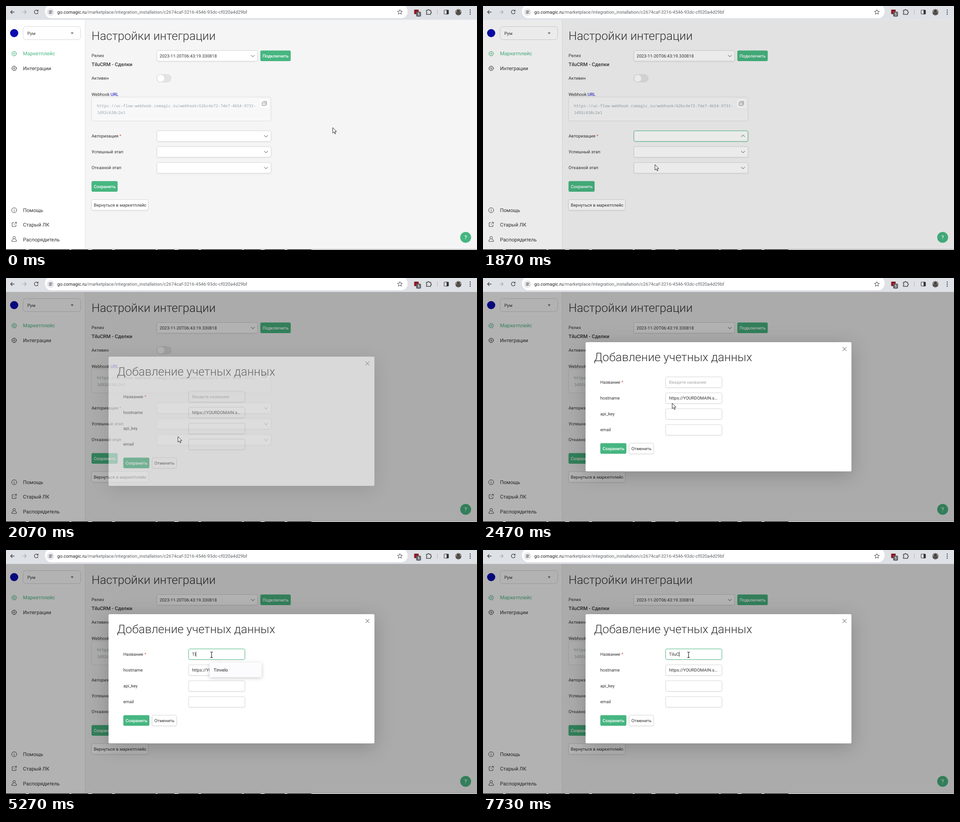
Animation of 1038 by 540 pixels, one loop 8000 ms. Source, as an HTML page:

```html
<!DOCTYPE html>
<html lang="ru">
<meta charset="utf-8">
<title>Настройки интеграции</title>
<style>
html, body { margin: 0; width: 100%; height: 100%; overflow: hidden; background: #f5f5f5 }
svg { display: block; width: 1038px; height: 540px }
text { font: 9.6px Roboto, sans-serif; fill: #333; text-rendering: geometricPrecision; white-space: pre }
.title { font-size: 26px; font-weight: 300 }
.menu { font-size: 11.2px }
.sub { font-size: 11px; font-weight: 500 }
.white { fill: #fff; font-weight: 500 }
.badge { font-size: 8.5px }
.help { font-size: 11.5px }
.suggestion { font-size: 9.9px; fill: #222 }
.url { font-size: 10.09px; fill: #5f6368 }
.mono { font: 8.73px "Noto Sans Mono", monospace; fill: #97a4ac }
.hint { fill: #aaa }
.green { fill: #47b681 }
.red { fill: #e2503c }
.blue { fill: #0a0ac4 }
.line { fill: none; stroke: #444; stroke-width: 1 }
.soft { filter: drop-shadow(0 1px 1px #0001) }
.float { filter: drop-shadow(0 2px 4px #0003) }
.modal { filter: drop-shadow(0 8px 20px #0003) }
</style>
<body>
<script>
const GREEN = '#47b681', BORDER = '#d6d6d6';

const text = (x, y, s, cls = '', id = '') => `<text x="${x}" y="${y}" class="${cls}" id="${id}">${s}</text>`;
const rect = (x, y, w, h, fill, stroke = 'none', r = 3, extra = '') =>
  `<rect x="${x}" y="${y}" width="${w}" height="${h}" rx="${r}" fill="${fill}" stroke="${stroke}" ${extra}/>`;
const circle = (x, y, r, fill, extra = '') => `<circle cx="${x}" cy="${y}" r="${r}" fill="${fill}" ${extra}/>`;
const path = (d, extra = '') => `<path d="${d}" class="line" ${extra}/>`;
const group = (id, s) => `<g id="${id}">${s}</g>`;
const button = (x, y, w, label) => rect(x, y, w, 23.5, GREEN) + text(x + 5, y + 15.5, label, 'white');
const plainButton = (x, y, w, label) =>
  rect(x, y, w, 23.5, '#fff', BORDER, 3, 'class="soft"') + text(x + 5, y + 15.5, label);
const field = (x, y, w, id = '') => rect(x, y, w, 23.5, '#fff', BORDER, 3, `class="soft" id="${id}"`);
const chevron = (x, y, id = '') => path(`M${x - 4} ${y - 2}l4 4l4 -4`, `id="${id}"`);

const toolbar = rect(0, 0, 1038, 30.5, '#dee1e6', 'none', 0) + rect(86, -3, 799, 30, '#fff', 'none', 14) +
  path('M18.5 13.5h-8M14 9.5l-4 4l4 4', 'style="stroke-width:1.3"') +
  path('M36 13.5h8M40.5 9.5l4 4l-4 4', 'style="stroke:#a3a6aa;stroke-width:1.2"') +
  path('M70 10.6a4.2 4.2 0 1 0 .8 3.4M70.6 8.6v2.8h-2.8', 'style="stroke-width:1.3"') +
  circle(98, 13.5, 8.5, '#e9ebee') +
  path('M94 11.5h3M100 11.5h2.5M94 15.5h2.5M99.5 15.5h3') +
  circle(98.6, 11.5, 1.4, 'none', 'class="line"') + circle(97.6, 15.5, 1.4, 'none', 'class="line"') +
  text(113, 17, '<tspan fill="#202124">go.comagic.ru</tspan>/marketplace/integration_installation/c2674caf-3216-4546-93dc-cf020a4d29bf', 'url') +
  path('M868 8l1.5 3.6l3.9 .3l-3 2.5l1 3.8l-3.4 -2.1l-3.4 2.1l1 -3.8l-3 -2.5l3.9 -.3z') +
  rect(899.5, 8, 10, 10, '#8c1b24', 'none', 1) + rect(904, 12.5, 10.5, 11, '#5b5e63', 'none', 2) +
  text(907, 21.3, '5', 'white badge') +
  path('M926.5 9.5h3a1.7 1.7 0 0 1 3.4 0h3v3a1.7 1.7 0 0 1 0 3.4v2.6h-9.4v-3a1.6 1.6 0 0 0 0 -3z', 'style="stroke-width:1.4"') +
  path('M950.5 8v11', 'style="stroke:#b4b7bb"') +
  rect(965.5, 9, 9.5, 9, 'none', '#333', 1) + rect(971, 9, 4.5, 9, '#333', 'none', 0) +
  circle(997, 13.5, 7, '#8f8a86') + circle(997, 11.5, 3, '#3c3836') +
  path('M991 17a6 5 0 0 1 12 0a7 7 0 0 1 -12 0', 'style="fill:#55504e;stroke:none"') +
  [9, 13.5, 18].map(y => circle(1023, y, 1.2, '#333')).join('');

const cog = (y, color) => circle(18, y, 4.6, 'none', `stroke="${color}"`) +
  circle(18, y, 5.3, 'none', `stroke="${color}" stroke-dasharray="2 2.16"`) + circle(18, y, 1.7, 'none', `stroke="${color}"`);

const sidebar = rect(0, 31, 174, 507, '#fff', 'none', 0) + path('M174.5 31V538', 'style="stroke:#e4e4e4"') +
  circle(18, 60, 9, '#0b0bb0') + rect(37.5, 45.5, 127, 29, '#fff', BORDER, 6) +
  text(47, 63.5, 'Рум') + '<path d="M142.5 58.5h6.5l-3.25 4z" fill="#777"/>' +
  cog(105.5, GREEN) + text(37.5, 109.4, 'Маркетплейс', 'menu green') +
  cog(138, '#444') + text(37.5, 142, 'Интеграции', 'menu') +
  circle(18, 452, 5.5, 'none', 'class="line"') + path('M18 451v4M18 448.8v1.2') + text(37.5, 456, 'Помощь', 'menu') +
  path('M17.5 479.5h-4v8.5h8.5v-4M17.5 484l5.5 -5.5M19.5 478.5h3.5v3.5') + text(37.5, 488, 'Старый ЛК', 'menu') +
  circle(18, 512.8, 2.8, 'none', 'class="line"') + path('M16.5 515.5l-3.5 2.5v3h10v-3l-3.5 -2.5') +
  text(37.5, 520.7, 'Распорядитель', 'menu');

const page = text(188.5, 75, 'Настройки интеграции', 'title') +
  text(188.5, 113.4, 'Релиз') + field(332.5, 98.5, 222) + text(338.5, 113.5, '2023-11-20T06:43:19.330818') + chevron(544, 110.5) +
  button(560.5, 98.5, 67, 'Подключить') + text(188.5, 132.8, 'TiluCRM - Сделки', 'sub') +
  text(188.5, 163.4, 'Активен') + rect(332, 151.5, 32, 17, '#e3e3e3', '#d9d9d9', 8.5) + circle(341, 160, 7.7, '#fff') +
  text(188.5, 199, 'Webhook') + text(230.5, 199, 'URL', 'blue') +
  rect(188.5, 201.5, 395.5, 53, '#f8f8f8', '#dcdcdc') +
  text(200.5, 223.8, 'https://uc-flow-webhook.comagic.ru/webhook/62bc4e72-7de7-4b54-9731-', 'mono') +
  text(200.5, 238.8, '1d92c638c2e1', 'mono') + rect(558, 204.5, 23, 22.5, '#fff', '#ececec') +
  path('M566.5 211h8v8M564.5 213h8v7.5h-8zM567.5 215l-1.3 1.7l1.3 1.7M569.5 215l1.3 1.7l-1.3 1.7', 'style="stroke:#777;stroke-width:.8"') +
  text(188.5, 291, 'Авторизация') + text(250, 291, '*', 'red') + field(332.5, 276.2, 251.5, 'auth') + chevron(573, 288, 'authChevron') +
  text(188.5, 326, 'Успешный этап') + field(332.5, 311.2, 251.5) + chevron(573, 323) +
  text(188.5, 361.2, 'Отказной этап') + field(332.5, 346.5, 251.5) + chevron(573, 358.3) +
  button(188.5, 387.5, 57.5, 'Сохранить') + plainButton(188.5, 428.5, 125, 'Вернуться в маркетплейс') +
  circle(1013, 512, 12, GREEN) + text(1010.2, 516, '?', 'white help');

const options = ['https://uiscom.s20.online/', 'ТилуСРМ', 'https://uiscom2.s20.online/', 'TiluCRM API Auth', 'https://uiscom3.s20.online/'];
const dropdown = rect(333, 300.5, 251, 206, '#fff', 'none', 2, 'class="float"') +
  rect(338.5, 306.5, 239, 23, '#fff', GREEN) + circle(350, 316.8, 3.6, 'none', 'class="line"') + path('M352.7 319.5l3 3M361.5 312.5v11') +
  path('M339.5 344.5h10M344.5 339.5v10') + text(356, 348, 'Добавить') + path('M333 359.5h251', 'style="stroke:#e5e5e5"') +
  options.map((s, i) => text(342, 377.3 + i * 29.3, s)).join('');

const labels = ['Название', 'hostname', 'api_key', 'email'];
const modal = rect(226, 142, 586, 286, '#fff', 'none', 3, 'class="modal"') +
  path('M792.3 152.8l8.6 8.6M800.9 152.8l-8.6 8.6') + text(244.5, 183.5, 'Добавление учетных данных', 'title') +
  labels.map((s, i) => text(258.5, 233.6 + i * 35.2, s) + field(402.5, 218.9 + i * 35.2, 124, 'input' + i)).join('') +
  text(305, 233.6, '*', 'red') + text(410, 269.3, 'https://YOURDOMAIN.s…') +
  text(410, 234.2, 'Введите название', 'hint', 'hint') + text(410, 234.2, '', '', 'typed') +
  rect(0, 225, 1, 11, '#222', 'none', 0, 'id="caret"') +
  button(258.5, 365.5, 57.5, 'Сохранить') + plainButton(322, 365.5, 54, 'Отменить');

const pointer = '<path id="arrow" d="M0 0V12.2L2.8 9.6L4.8 14L6.7 13.2L4.8 8.9H8.5Z" fill="#fff" stroke="#111" stroke-width=".9"/>' +
  path('M-3 -6h2.2l.8 .7l.8 -.7h2.2M0 -5.3V5.3M-3 6h2.2l.8 -.7l.8 .7h2.2', 'id="beam" style="stroke:#111;stroke-width:1.1"');

document.body.innerHTML = `<svg viewBox="0 0 1038 540">${rect(0, 0, 1038, 540, '#f5f5f5', 'none', 0)}${sidebar}${page}` +
  group('dropdown', dropdown) + rect(0, 30.5, 1038, 508, '#000', 'none', 0, 'id="shade"') + toolbar +
  path('M0 538.6H1038', 'style="stroke:#8a8a8a"') + path('M0 539.5H673', 'style="stroke:#111" stroke-dasharray="44 6 90 4 37 9"') +
  group('modal', modal) + group('popup', '') + group('pointer', pointer) + '</svg>';

const $ = id => document.getElementById(id);
const ramp = (t, from, to) => Math.max(0, Math.min(1, (t - from) / (to - from)));
const show = (id, opacity) => $(id).setAttribute('opacity', +opacity);

// Pointer stops: time, x, y
const route = [[200, 720, 269], [733, 448, 296], [1000, 448, 296], [1267, 424, 341], [1700, 379, 351],
  [2133, 379, 351], [2467, 417, 277], [2733, 440, 248], [3067, 453, 232]];
function pointerAt(t) {
  const i = route.findIndex(p => p[0] > t);
  if (i < 0) return route.at(-1).slice(1);
  if (!i) return route[0].slice(1);
  const [a, b] = [route[i - 1], route[i]], k = ramp(t, a[0], b[0]), e = k * k * (3 - 2 * k);
  return [a[1] + (b[1] - a[1]) * e, a[2] + (b[2] - a[2]) * e];
}

const FOCUS = 3130, keyTimes = [4860, 5260, 7060, 7260, 7730], word = 'TiluC';
const suggestions = [
  ['Тестовая интеграция', 'Сделки', 'Продажи', 'Тест', 'Новая заявка', 'Tinvelo'],
  ['Tinvelo', 'Test', 'Test 2', 'Tariff', 'Token', 'Type'],
  ['Tinvelo']];

function popupMarkup(typed) {
  const rows = suggestions[Math.min(typed, 2)], w = typed ? 115 : 159.5;
  return `<g class="float">${rect(448.5, 249, w, 32.5 + (rows.length - 1) * 26.6, '#fcfbfd', 'none', 2)}` +
    '<path d="M458 249.5l5 -4l5 4z" fill="#fcfbfd"/></g>' +
    rows.map((s, i) => text(457.5, 269 + i * 26.6, s, 'suggestion')).join('');
}

function draw(time) {
  // The picture advances 15 times a second.
  const t = Math.floor((time + 4) * 15 / 1000) * 1000 / 15;

  const open = t >= 995 && t < 1930;
  $('auth').setAttribute('stroke', t >= 460 && t < 1930 ? GREEN : BORDER);
  $('authChevron').setAttribute('transform', open ? 'matrix(1 0 0 -1 0 575.5)' : '');
  show('dropdown', ramp(t, 940, 1130) * (1 - ramp(t, 1720, 1860)));
  show('shade', 0.3 * ramp(t, 1795, 2065));

  const rise = ramp(t, 1900, 2200);
  show('modal', rise);
  $('modal').setAttribute('transform', `translate(0 ${72 * (1 - rise)})`);

  const typed = keyTimes.filter(k => t >= k).length, focused = t >= FOCUS;
  $('input0').setAttribute('stroke', focused ? GREEN : BORDER);
  show('hint', !typed);
  $('typed').textContent = word.slice(0, typed);
  $('caret').setAttribute('x', 410 + (typed && $('typed').getComputedTextLength()));
  show('caret', focused && (t - (typed ? keyTimes[typed - 1] : FOCUS)) % 1066.7 < 530);

  const popup = $('popup');
  if (popup.dataset.typed !== String(typed)) {
    popup.dataset.typed = typed;
    popup.innerHTML = popupMarkup(typed);
  }
  show('popup', focused ? 1 - ramp(t, 7000, 7200) : 0);

  const [x, y] = pointerAt(t);
  const beam = t > 2200 && ((y > 219 && y < 242.5) || (y > 254 && y < 276.5));
  $('pointer').setAttribute('transform', `translate(${x} ${y})`);
  show('arrow', !beam);
  show('beam', beam);
}

const start = performance.now();
(function tick() {
  draw((performance.now() - start) % 8000);
  requestAnimationFrame(tick);
})();
</script>
</body>
</html>
```
